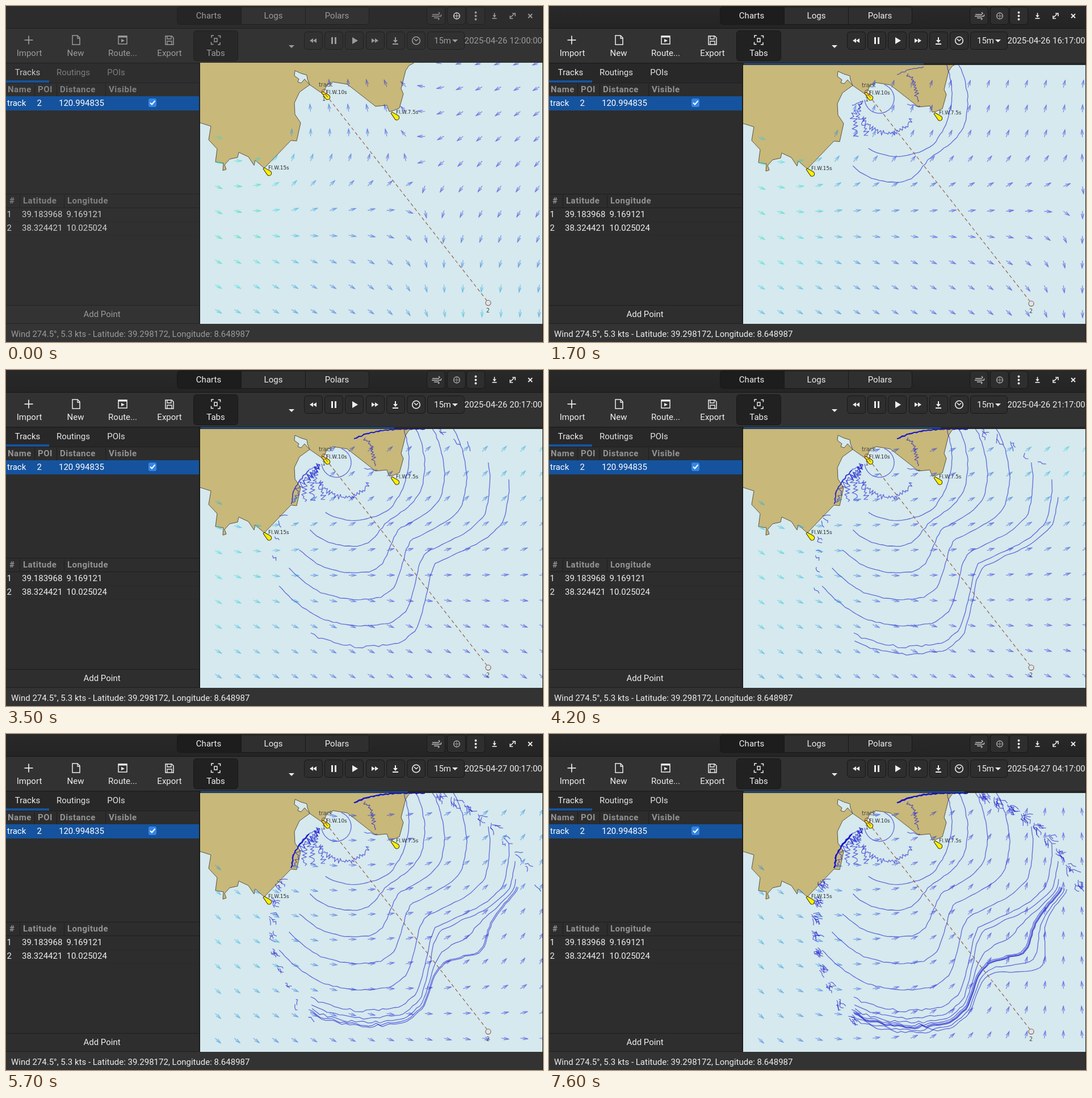
Recreate the animation shown at these times as an HTML page with a canvas. Size 946x592 px, loop 8 s.

```html
<!DOCTYPE html>
<html lang="en">
<head>
<meta charset="utf-8">
<title>Routing</title>
<style>
html, body { margin: 0; width: 100%; height: 100%; overflow: hidden; background: #2d2d2d; }
canvas { display: block; }
</style>
</head>
<body>
<canvas id="stage" width="946" height="592"></canvas>
<script>
const c = document.getElementById('stage').getContext('2d');
const LOOP = 8000;
const UI = 'Roboto, sans-serif', MAP = '"DejaVu Sans", sans-serif';
const STEPS = [800, 900, 1000, 1300, 1700, 2100, 2700, 3100, 3500, 4200, 4500, 5200, 5700, 6100, 6600, 7100, 7600];
const lerp = (a, b, t) => a + (b - a) * t;
const clamp = v => Math.max(0, Math.min(1, v));
const smooth = v => clamp(v) ** 2 * (3 - 2 * clamp(v));
const bell = (d, w) => Math.exp(-((d / w) ** 2));
const rad = deg => deg * Math.PI / 180;
const parse = s => s.split(' ').map(p => p.split(',').map(Number));

function random(seed) {
  return () => {
    seed = (seed * 1664525 + 1013904223) >>> 0;
    return seed / 4294967296;
  };
}

// Drawing helpers
let focus = 1;
const grey = (idle, active) => {
  const v = Math.round(lerp(idle, active, focus));
  return `rgb(${v},${v},${v})`;
};
function rect(x, y, w, h, fill) {
  c.fillStyle = fill;
  c.fillRect(x, y, w, h);
}
function text(s, x, y, color, font = '15px ' + UI, align = 'left', gap = 0) {
  c.font = font;
  c.textAlign = align;
  c.letterSpacing = gap + 'px';
  c.fillStyle = color;
  c.fillText(s, x, y);
}
function line(s, color, width = 1, fill, close) {
  c.beginPath();
  parse(s).forEach(([x, y]) => c.lineTo(x, y));
  if (close) c.closePath();
  if (fill) { c.fillStyle = fill; c.fill(); }
  if (color) { c.strokeStyle = color; c.lineWidth = width; c.stroke(); }
}
function button(x, y, w, h, fill, border = grey(32, 24)) {
  c.beginPath();
  c.roundRect(x + .5, y + .5, w - 1, h - 1, 5);
  c.fillStyle = fill;
  c.fill();
  c.strokeStyle = border;
  c.lineWidth = 1;
  c.stroke();
}
function ring(x, y, r, color, width = 1) {
  c.beginPath();
  c.arc(x, y, r, 0, Math.PI * 2);
  c.strokeStyle = color;
  c.lineWidth = width;
  c.stroke();
}
function icon(x, y, draw) {
  c.save();
  c.translate(x, y);
  draw();
  c.restore();
}

// Wind heading in radians: a westerly flow pushes a north-easterly one out to the right
function heading(k, j, h) {
  const v = j / 9;
  const early = 30 - (125 - 6 * h) * smooth((j - 1) / 7) * Math.min(1, .1 + k / 4.5);
  const low = lerp(Math.min(1, .4 + j / 5), 1, clamp(h - 14.5));
  const late = 42 - (90 + 10 * Math.max(0, h - 11)) * low * k / 17;
  const west = rad(lerp(early, late, clamp((h - 7.5) / 3.5)));
  const east = rad(95 + 55 * v + 20 * h * v ** 3);
  const edge = 10.5 + h * (1 + .12 * j);
  const w = 1 / (1 + Math.exp((edge - k) / 1.2));
  return Math.atan2(lerp(Math.sin(west), Math.sin(east), w), lerp(Math.cos(west), Math.cos(east), w));
}
// Calm air is indigo; stronger patches turn blue, cyan and green
function calm(k, j, h) {
  const left = (8 - .25 * h) * bell(k, 5.5) * bell(j - 4, 6);
  const corner = 6 * bell(h - 9.5, 3.5) * bell(k - 17, 5) * bell(j - 9, 3);
  const south = 5 * bell(h, 2) * bell(k - 14, 5) * bell(j, 2.5);
  return clamp((9 - left - corner - south) / 9);
}
function drawWind(h) {
  for (let j = 0; j <= 10; j++) for (let k = 0; k < 18; k++) {
    if (j > 8 && k < 6 || j === 8 && k < 5 || j === 7 && k > 0 && k < 4) continue;
    c.save();
    c.translate(368.5 + 33.6 * k, 536 - 43.6 * j);
    c.rotate(heading(k, j, h));
    c.strokeStyle = `hsla(${150 + 90 * calm(k, j, h)},72%,52%,.58)`;
    c.lineWidth = 1.1;
    c.beginPath();
    c.moveTo(0, 0);
    c.lineTo(13.5, 0);
    c.moveTo(4.5, -2.4);
    c.lineTo(13.5, 0);
    c.lineTo(4.5, 2.4);
    c.stroke();
    c.restore();
  }
}

// Isochrones around the start, one path per hour
const HOME = { x: 562, y: 153 }, LAST = 16;
const fronts = Array.from({ length: LAST + 1 }, () => new Path2D());
const polar = (deg, r, o = HOME) => [o.x + r * Math.cos(rad(deg)), o.y + r * Math.sin(rad(deg))];
// Relative reach by bearing: two lobes with a notch near the direct course
const REACH = parse('-25,.82 -5,.91 8,.96 20,.98 27,.93 36,.84 44,.79 49,.82 55,.9 62,1.01 68,1.04 80,1 92,.94 112,.78');

function reach(deg) {
  let i = 1;
  while (i < REACH.length - 1 && deg > REACH[i][0]) i++;
  const [a, p] = REACH[i - 1], [b, q] = REACH[i];
  return lerp(p, q, (deg - a) / (b - a));
}
function radius(n, deg) {
  const size = n < 8 ? 47 * n - 26 : 371 - 31 * Math.exp((8 - n) / 1.8) + 4 * Math.max(0, n - 14);
  const open = 1.3 - .009 * Math.max(0, deg - 40);
  const young = .95 * .42 ** (n - 3);
  const fill = clamp((n - 9) / 2) + .25 * Math.max(0, n - 14);
  return size * (lerp(reach(deg), open, young) + .16 * fill * bell(deg - 41, 9));
}
function addFront(n) {
  const from = n < 7 ? -24 : Math.min(19, 5 * n - 33);
  const to = n < 8 ? 112 - 20 * Math.exp((3 - n) * .7) : 95;
  const rnd = random(Math.min(n, 11) * 977);
  for (let a = from; a < to; a += 400 / radius(n, a)) {
    const rough = n > 7 && a > 72 ? 2.4 : .9;
    fronts[n].lineTo(...polar(a, radius(n, a) + (rnd() * 2 - 1) * rough));
  }
}
// Polyline with random sideways offsets
function jagged(n, pts, amp, step) {
  const rnd = random(n * 631 + Math.round(pts[0][0]));
  fronts[n].moveTo(...pts[0]);
  for (let i = 1; i < pts.length; i++) {
    const [ax, ay] = pts[i - 1], dx = pts[i][0] - ax, dy = pts[i][1] - ay;
    const len = Math.hypot(dx, dy), count = Math.ceil(len / step);
    for (let s = 1; s <= count; s++) {
      const off = (s % 2 ? 1 : -1) * amp * (rnd() * 1.3 - .3);
      fronts[n].lineTo(ax + (dx * s - dy * off * count / len) / count, ay + (dy * s + dx * off * count / len) / count);
    }
  }
}
function shard(n, [x, y], deg, size) {
  const rnd = random(n * 389 + Math.round(x * 7 + y));
  x += (rnd() - .5) * 9;
  y += (rnd() - .5) * 12;
  fronts[n].moveTo(x, y);
  for (let s = 0; s < 3; s++) {
    [x, y] = polar(deg + (rnd() - .5) * 130, size * (.3 + rnd() * .3), { x, y });
    fronts[n].lineTo(x, y);
  }
}

fronts[1].arc(582, 163, 26, rad(-70), rad(175));
const arc = [];
for (let a = 30; a <= 155; a += 12.5) arc.push(polar(a, 49, { x: 597, y: 175 }));
jagged(2, arc, 5, 2.6);
jagged(2, parse('633,119 645,140 651,169'), 5, 2.6);
jagged(2, parse('534,175 550,168'), 1, 5);
jagged(2, parse('631,173 654,177'), 1, 6);
for (let n = 3; n <= LAST; n++) {
  const d = n - 3;
  addFront(n);
  if (n < 7) jagged(n, [[553, 167], [545 - 9 * d, 190 + 4 * d], [562 - 18 * d, 228 + 2 * d]], 7, 3.2);
  else jagged(n, parse('534,176 518,194 506,214 503,236'), 1.8, 5);
  if (n > 3) jagged(n, parse('613,121 635,112 660,107 690,104 738,104').slice(0, n - 1), 1.4, 5);
}
// Shards pile up where the fronts meet the coast and the outer rim
for (let i = 0; i < 9; i++) {
  const y = 262 + i * 30, left = [470 + (y - 335) ** 2 / 430 - 4, y];
  const a = -13 + i * 3.7, right = polar(a, 206 + 6 * (a + 13));
  for (let n = 7 + Math.round(i * .6); n <= LAST; n++) {
    shard(n, left, 45, 10);
    shard(n, right, 48, 12);
  }
}

const LAND = '330,203 342,207 361,213 357,237 372,253 369,276 383,278 382,291 388,289 385,281 394,271 408,268 410,259 427,267 437,282 439,273 455,287 502,238 512,239 519,207 509,192 508,172 517,153 535,140 558,156 565,141 576,135 601,139 614,149 651,178 671,176 675,187 681,186 693,181 700,156 696,147 704,115 710,106 718,102 718,90 330,90';
const LAGOON = '509,115 520,120 530,123 531,130 535,140 526,130 520,137 514,135 516,130 508,124';

function beacon(x, y, label, tx, ty) {
  icon(x, y, () => {
    c.rotate(.75);
    c.beginPath();
    c.moveTo(0, -1.3);
    c.lineTo(11, -4);
    c.arc(13, 0, 4.2, -1.9, 1.9);
    c.lineTo(0, 1.3);
    c.closePath();
    c.fillStyle = '#ffee00';
    c.fill();
    c.strokeStyle = '#33300a';
    c.lineWidth = 1;
    c.stroke();
  });
  text(label, tx, ty, '#2a2a2a', '8.8px ' + MAP);
}

function drawMap(step) {
  const top = step < 0 ? 100 : 104;
  c.save();
  c.beginPath();
  c.rect(342, top, 603, 560 - top);
  c.clip();
  rect(342, 100, 603, 460, '#d5e9ee');
  c.translate(0, step < 0 ? -1.2 : 0);
  line(LAND, '#5a5440', 1, '#c8b87a', true);
  line(LAGOON, '#5a5440', 1, '#d5e9ee', true);
  beacon(454, 287, 'Fl.W.15s', 462, 289);
  beacon(557, 153, 'Fl.W.10s', 564, 156);
  beacon(679, 189, 'Fl.W.7.5s', 687, 191);
  c.strokeStyle = 'rgba(20,20,205,.6)';
  c.lineWidth = 1.3;
  c.lineJoin = 'round';
  for (let n = 1; n <= step; n++) c.stroke(fronts[n]);
  c.setLineDash([6, 4.6]);
  line('563,157 847,520', '#98503f', 1.1);
  c.setLineDash([]);
  ring(560.5, 152.5, 4.6, '#98503f', 1.1);
  ring(849.5, 524.3, 4.6, '#98503f', 1.1);
  text('track', 551, 143, '#444', '9.6px ' + MAP);
  text('1', 560, 168, '#444', '9.6px ' + MAP, 'center');
  text('2', 849, 541, '#444', '9.6px ' + MAP, 'center');
  drawWind(Math.max(0, step));
  c.restore();
  if (step >= 0) {
    rect(342, 100, 604, 4, '#272727');
    rect(343, 101, 293 + 6 * step, 2, '#15539e');
  }
}

function drawTitle(fg) {
  const g = c.createLinearGradient(0, 0, 0, 39);
  g.addColorStop(0, grey(44, 41));
  g.addColorStop(1, grey(44, 36));
  rect(0, 0, 946, 40, g);
  rect(0, 39, 946, 1, grey(32, 24));
  button(301, 1, 339, 32, grey(50, 47));
  c.save();
  c.beginPath();
  c.rect(302, 2, 112, 30);
  c.clip();
  button(301, 1, 130, 32, grey(37, 29));
  c.restore();
  rect(414, 2, 1, 30, grey(32, 24));
  rect(527, 2, 1, 30, grey(32, 24));
  text('Charts', 357, 22, fg, undefined, 'center');
  text('Logs', 471, 22, fg, undefined, 'center');
  text('Polars', 583, 22, fg, undefined, 'center');
  [741, 777, 811].forEach(x => button(x, 1, 33, 32, grey(48, 46)));
  const soft = grey(145, 190);
  line('751,15 762,15 764,13 762,11', soft, 1.4);
  line('750,18 766,18 767,15', soft, 1.4);
  line('754,21 762,21 763,23 761,24', soft, 1.4);
  ring(794, 17.5, 5.4, grey(205, 160), 1.5);
  line('788,17.5 800,17.5', grey(205, 150));
  line('794,11.5 794,23.5', grey(205, 150));
  [11.5, 17.5, 23.5].forEach(y => {
    c.beginPath();
    c.arc(827.5, y, 1.9, 0, 7);
    c.fillStyle = fg;
    c.fill();
  });
  download(860.5, 17, fg, .8);
  line('889,20 895,14', fg, 1.6);
  line('892,13 897,13 897,18', fg, 1.6);
  line('888,17 888,22 893,22', fg, 1.6);
  line('920,14 927,21', fg, 1.8);
  line('927,14 920,21', fg, 1.8);
}
function download(x, y, fg, s) {
  icon(x, y, () => {
    c.scale(s, s);
    line('0,-6 0,3', fg, 2);
    line('-4,-1 4,-1 0,4', null, 0, fg, true);
    line('-5,6 5,6', fg, 2);
  });
}

function drawToolbar(fg, stamp) {
  rect(0, 40, 946, 60, grey(51, 50));
  rect(0, 100, 946, 1, grey(32, 24));
  button(330, 43, 79, 54, grey(40, 33));
  [['Import', 41], ['New', 122.5], ['Route...', 205.5], ['Export', 288], ['Tabs', 369.5]]
    .forEach(([s, x]) => text(s, x, 88, fg, undefined, 'center'));
  line('32.5,60 47.5,60', fg, 1.7);
  line('40,52.5 40,67.5', fg, 1.7);
  line('117,52 126,52 130,56 130,68 117,68', fg, 1.5, null, true);
  line('126,52 126,57 130,57', fg, 1.3);
  line('198,53 213,53 213,67 198,67', fg, 1.5, null, true);
  line('198,54 213,54', fg, 3);
  line('203,58 209,61 203,64', null, 0, fg, true);
  line('281,53 292,53 295,56 295,68 281,68', fg, 1.5, null, true);
  line('284,53 284,58 291,58 291,53', fg, 1.3);
  line('284,68 284,62 292,62 292,68', fg, 1.3);
  icon(369.5, 60, () => {
    for (let i = 0; i < 4; i++) {
      line('-7.5,-4 -7.5,-8 -3.5,-8', fg, 1.5);
      c.rotate(Math.PI / 2);
    }
    line('-2.5,-3 2.5,-3 2.5,3 -2.5,3', fg, 1.4, null, true);
  });
  line('498,69 508,69 503,74', null, 0, fg, true);
  [525, 561, 597, 634, 670, 706].forEach(x => button(x, 45, 33, 32, grey(49, 46)));
  button(742, 45, 66, 32, grey(49, 46));
  [0, 6].forEach(d => {
    line(`${541 + d},57 ${541 + d},65 ${535 + d},61`, null, 0, fg, true);
    line(`${644 + d},57 ${644 + d},65 ${650 + d},61`, null, 0, fg, true);
  });
  rect(573, 55, 3, 12, fg);
  rect(579, 55, 3, 12, fg);
  line('610,55 620,61 610,67', null, 0, fg, true);
  download(686, 61, fg, 1);
  ring(722.5, 61, 6.8, fg, 1.6);
  line('719,58 722.5,61.5 726,58.5', fg, 1.5);
  text('15m', 754, 66, fg);
  line('786,59 796,59 791,64', null, 0, fg, true);
  text(stamp, 807.5, 66, fg);
}

function drawSide(fg) {
  const value = grey(205, 238), edge = grey(36, 30), head = grey(130, 148);
  const title = (s, x, y) => text(s, x, y, head, 'bold 15px ' + UI, 'left', .5);
  rect(0, 101, 342, 459, grey(48, 45));
  rect(0, 101, 341, 35, grey(46, 40));
  rect(0, 131, 76, 4, '#15539e');
  rect(0, 135, 341, 1, edge);
  text('Tracks', 38, 122, grey(200, 238), undefined, 'center');
  text('Routings', 118.5, 122, grey(125, 228), undefined, 'center');
  text('POIs', 194, 122, grey(125, 228), undefined, 'center');
  title('Name', 3, 152);
  title('POI', 56, 152);
  title('Distance', 95, 152);
  title('Visible', 181, 152);
  [50, 89, 175].forEach(x => rect(x, 137, 1, 22, edge));
  rect(0, 159, 340, 25, '#15539e');
  text('track', 2, 176, '#fff');
  text('2', 54.5, 176, '#fff');
  text('120.994835', 93, 176, '#fff');
  c.beginPath();
  c.roundRect(251, 163, 14, 15, 3);
  c.fillStyle = '#3584e4';
  c.fill();
  line('254,170.5 257,173.5 262.5,167', '#fff', 2);
  rect(0, 331, 341, 1, edge);
  title('#', 6, 348);
  title('Latitude', 30, 348);
  title('Longitude', 108, 348);
  [24, 102].forEach(x => rect(x, 333, 1, 22, edge));
  rect(0, 355, 341, 1, edge);
  [['1', '39.183968', '9.169121', 372], ['2', '38.324421', '10.025024', 396]].forEach(([n, lat, lon, y]) => {
    text(n, 1.5, y, value);
    text(lat, 28, y, value);
    text(lon, 106.5, y, value);
    rect(0, y + 8, 341, 1, grey(44, 41));
  });
  rect(0, 527, 341, 32, grey(51, 46));
  rect(0, 527, 341, 1, edge);
  text('Add Point', 169, 548, fg, undefined, 'center');
  rect(340, 101, 2, 458, edge);
  rect(0, 560, 946, 32, grey(52, 51));
  rect(0, 559, 342, 1, edge);
  text('Wind 274.5°, 5.3 kts - Latitude: 39.298172, Longitude: 8.648987', 9, 583, fg);
}

function draw(t) {
  const step = STEPS.filter(s => t >= s).length - 1;
  focus = t < 700 ? 0 : t < 800 ? .35 : t < 900 ? .7 : 1;
  const hour = 12 + Math.max(0, step), pad = v => String(v).padStart(2, '0');
  const stamp = `2025-04-${26 + Math.floor(hour / 24)} ${pad(hour % 24)}:${step < 0 ? '00' : '17'}:00`;
  const fg = grey(155, 238);
  rect(0, 0, 946, 592, '#2d2d2d');
  drawTitle(fg);
  drawToolbar(fg, stamp);
  drawSide(fg);
  drawMap(step);
  rect(945, 0, 1, 592, '#1e1e1e');
}

const start = performance.now();
function frame() {
  draw((performance.now() - start) % LOOP);
  requestAnimationFrame(frame);
}
frame();
</script>
</body>
</html>
```
